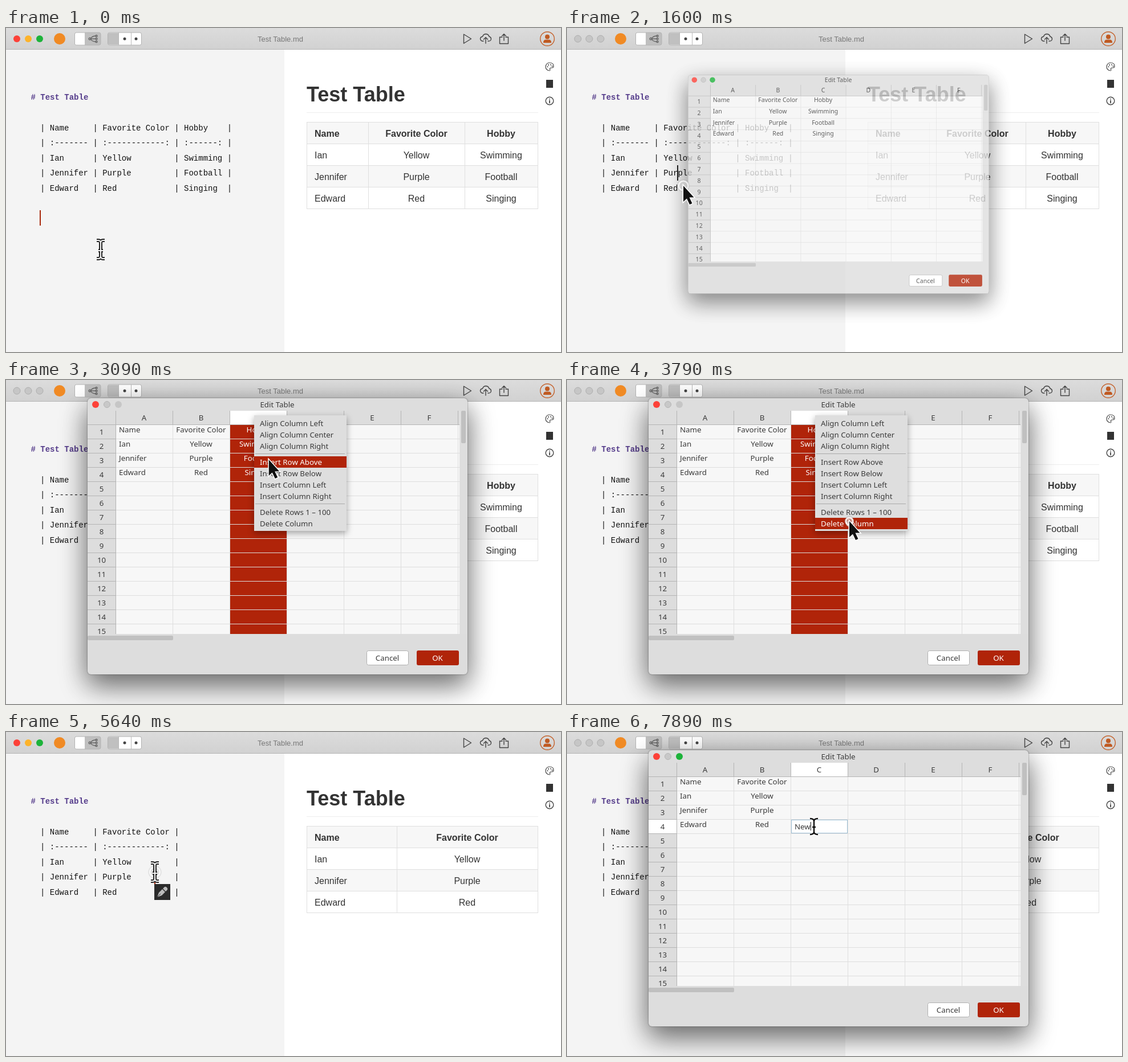
Animation, 973 px wide and 569 px high, one loop 8 s. Source, as an HTML page:

```html
<!DOCTYPE html>
<html lang="en">
<head>
<meta charset="utf-8">
<title>Table editor</title>
<style>
  html, body { margin: 0; width: 100%; height: 100%; overflow: hidden; background: #fff; }
  svg { display: block; width: 973px; height: 569px; }
  text { white-space: pre; fill: #333; font: 16px "Liberation Sans", Arial, sans-serif; }
  .mid { text-anchor: middle; }
  .bold { font-weight: bold; }
  .code { font: 14px "Liberation Mono", monospace; fill: #111; }
  .head { font-weight: bold; fill: #553c8b; }
  .ui { font: 13.3px "Noto Sans", "Open Sans", sans-serif; fill: #3a3a3a; }
  .light { fill: #fff; }
  .icon { fill: none; stroke: #444; stroke-width: 1.4; stroke-linejoin: round; stroke-linecap: round; }
  #dialog { transform-origin: 476px 274.5px; }
  #frame { filter: drop-shadow(0 18px 24px rgba(0,0,0,.45)) drop-shadow(0 0 1px rgba(0,0,0,.5)); }
  #menu > rect:first-child { filter: drop-shadow(0 4px 6px rgba(0,0,0,.35)); }
</style>
</head>
<body>
<svg viewBox="0 0 973 569">
  <defs>
    <linearGradient id="chrome" x2="0" y2="1">
      <stop stop-color="#dcdcdc"/><stop offset="1" stop-color="#d1d1d1"/>
    </linearGradient>
  </defs>
  <rect width="973" height="569" fill="#fff"/>
  <rect y="37" width="488" height="532" fill="#f4f4f4"/>
  <rect width="973" height="38" fill="url(#chrome)"/>
  <rect y="37" width="973" height="1" fill="#b4b4b4"/>

  <g id="lights"></g>
  <circle cx="94" cy="19" r="10" fill="#f08a24"/>
  <rect x="120.500" y="8" width="45.500" height="22" rx="3" fill="#bfbfbf" stroke="#b2b2b2"/>
  <path d="M123 8.500H138V29.500H123Q121 29.500 121 27V11Q121 8.500 123 8.500" fill="#fff"/>
  <g class="icon" stroke-width="1.200" style="stroke:#666">
    <path d="M148 19H157M148 19Q151 14 157 14M148 19Q151 24 157 24"/>
    <circle cx="147" cy="19" r="1.800"/><circle cx="158.500" cy="14" r="1.500"/>
    <circle cx="158.500" cy="19" r="1.500"/><circle cx="158.500" cy="24" r="1.500"/>
  </g>
  <rect x="178.500" y="8" width="59" height="22" rx="3" fill="#fff" stroke="#b2b2b2"/>
  <path d="M179 8.500H197V29.500H179Z" fill="#c0c0c0"/>
  <path d="M197.500 8V30M219.500 8V30" stroke="#b8b8b8"/>
  <circle cx="208" cy="19" r="2.500" fill="#444"/><circle cx="228" cy="19" r="2.500" fill="#444"/>
  <text class="mid" x="481" y="24" style="font-size:13px;fill:#777">Test Table.md</text>

  <g class="icon">
    <path d="M802.500 11V27L815.500 19Z"/>
    <path d="M837 23H835Q831.500 22 831.500 18.500Q832 15.500 835.500 15Q837 10.500 841.500 10.500Q846 11 847 15Q850.500 16 850.500 19.500Q850 23 846 23H845M841 27V17M837.500 20L841 16.500L844.500 20"/>
    <path d="M870 16H865.500V27.500H880.500V16H876M873 22V10.500M869.500 14L873 10.500L876.500 14"/>
    <path d="M953 75Q946 74 946 68Q947 61 953 61Q960 61 960 67Q960 70 956 70Q952 70 954 74" stroke-width="1.200"/>
    <path d="M949.500 68V68.100M951 64.800V64.900M955 64.500V64.600M957.500 67V67.100" stroke-width="2"/>
    <circle cx="953" cy="128" r="6.800"/><path d="M953 127.500V131.500M953 124.600V124.700" stroke-width="1.800"/>
  </g>
  <rect x="947" y="91" width="12" height="14" fill="#333"/>
  <circle cx="949" cy="19" r="12.300" fill="none" stroke="#c4622c" stroke-width="1.400"/>
  <circle cx="949" cy="15.500" r="4" fill="#c05a22"/>
  <path d="M942 26Q942 20.500 946 20.500H952Q956 20.500 956 26Z" fill="#c05a22"/>

  <text class="code head" x="43.500" y="126">#&#160;Test&#160;Table</text>
  <text class="bold" x="527" y="129" style="font-size:36px">Test Table</text>
  <rect x="527" y="148" width="406" height="1" fill="#eee"/>
  <g id="wide"></g>
  <g id="narrow"></g>
  <rect id="caret" width="2" height="27"/>
  <g id="pen">
    <rect width="28" height="28" fill="#2b2b2b"/>
    <path d="M5 23L8 15L14 9L19 14L13 20ZM15 8L18 5Q20 4 22 6Q24 8 23 10L20 13Z" fill="#bbb"/>
    <path d="M5 23L11 17" stroke="#2b2b2b"/>
  </g>
  <g id="dialog"></g>
  <g id="menu"></g>
  <circle id="ring" stroke="#fff" stroke-width="3" fill="#fff" fill-opacity=".4"/>
  <g id="pointer">
    <path id="arrow" d="M0 0V28L6 22.500L11 33L15.500 31L10.500 20.500H18.500Z" fill="#111" stroke="#fff" stroke-width="3" paint-order="stroke"/>
    <g id="beam" fill="none">
      <path id="beamShape" d="M-7-16H-4Q0-16 0-11V11Q0 16-4 16H-7M7-16H4Q0-16 0-11M0 11Q0 16 4 16H7M-4 2H4" stroke="#222" stroke-width="5.500"/>
      <use href="#beamShape" style="stroke:#fff"/>
      <path d="M-7-16H-4Q0-16 0-11V11Q0 16-4 16H-7M7-16H4Q0-16 0-11M0 11Q0 16 4 16H7M-4 2H4" stroke="#f4f4f4" stroke-width="2"/>
    </g>
    <g id="thinBeam" fill="none">
      <path d="M-7-14Q0-14 0-9V9Q0 14-7 14M7-14Q0-14 0-9V9Q0 14 7 14M-3 1H3" stroke="#fff" stroke-width="4.500"/>
      <path d="M-7-14Q0-14 0-9V9Q0 14-7 14M7-14Q0-14 0-9V9Q0 14 7 14M-3 1H3" stroke="#111" stroke-width="2.400"/>
    </g>
  </g>
</svg>
<script>
const LOOP = 8000, RED = '#b02409';
const $ = id => document.getElementById(id);
const show = (id, on) => $(id).style.display = on ? '' : 'none';
const set = (id, attrs) => { for (const k in attrs) $(id).setAttribute(k, attrs[k]); };
const text = (x, y, s, cls = '') => `<text x="${x}" y="${y}" class="${cls}">${s}</text>`;
const rect = (x, y, w, h, fill, more = '') => `<rect x="${x}" y="${y}" width="${w}" height="${h}" fill="${fill}" ${more}/>`;
const dot = (x, y, r, fill, more = '') => `<circle cx="${x}" cy="${y}" r="${r}" fill="${fill}" ${more}/>`;
const range = n => [...Array(n).keys()];

const data = [
  ['Name', 'Favorite Color', 'Hobby'],
  ['Ian', 'Yellow', 'Swimming'],
  ['Jennifer', 'Purple', 'Football'],
  ['Edward', 'Red', 'Singing']
];

// Markdown text on the left, rendered table on the right
function documentTable(edges) {
  const n = edges.length - 1, pads = [8, 14, 8];
  const line = cells => '| ' + cells.slice(0, n).map((c, i) => c.padEnd(pads[i])).join(' | ') + ' |';
  const lines = data.map(line);
  lines.splice(1, 0, line([':-------', ':------------:', ':------:']));
  let out = lines.map((s, i) => text(60, Math.round(179.6 + i * 26.5), s.replace(/ /g, '\u00a0'), 'code')).join('');
  out += rect(527, 165, 406, 38, '#f7f7f7') + rect(527, 241, 406, 38, '#f7f7f7');
  out += range(5).map(i => rect(527, 165 + i * 38, 406, 1, '#dfdfdf')).join('');
  out += edges.map(x => rect(x, 165, 1, 153, '#dfdfdf')).join('');
  data.forEach((row, r) => row.slice(0, n).forEach((s, c) => {
    const cls = (c ? 'mid ' : '') + (r ? '' : 'bold');
    out += text(c ? (edges[c] + edges[c + 1]) / 2 : 541, 191 + r * 38 - (r ? 1 : 0) + (r ? 1 : 0), s, cls);
  }));
  return out;
}

function cellText(c, cls = '') {
  return data.map((row, r) => text(c ? 242 + c * 100 : 198, 92 + r * 25, row[c], `ui ${c ? 'mid' : ''} ${cls}`)).join('');
}

function dialogMarkup() {
  const rows = range(15), cols = range(6);
  return rect(143, 32, 666, 485, '#dddddd', 'rx="6" id="frame"') +
    dot(157, 43, 6, '#fc4138') + dot(177, 43, 5.5, '#c8c8c8', 'stroke="#b5b5b5"') + dot(197, 43, 6, '#1db33a', 'id="zoom"') +
    text(475.5, 48, 'Edit Table', 'ui mid') +
    rect(193, 79, 602, 367, '#f7f7f7') +
    `<g id="selection">${rect(393, 79, 99, 367, RED)}</g>` +
    rows.map(i => rect(193, 103 + i * 25, 602, 1, '#dedede')).join('') +
    [0, ...cols].map((c, i) => rect(192 + i * 100, 79, 1, 367, '#dedede')).join('') +
    cellText(0) + cellText(1) +
    `<g id="hobby">${cellText(2)}</g><g id="hobbySelected">${cellText(2, 'light')}</g>` +
    rect(393, 54, 99, 24, '#fff', 'id="headC"') + rect(143, 154, 49, 24, '#fff', 'id="headRow"') +
    cols.map(c => rect(192 + c * 100, 54, 1, 24, '#b4b4b4') + text(242 + c * 100, 71, 'ABCDEF'[c], 'ui mid')).join('') +
    rect(792, 54, 1, 24, '#b4b4b4') + rect(143, 78, 652, 1, '#b4b4b4') + rect(192, 54, 1, 392, '#b4b4b4') +
    rows.map(i => rect(143, 103 + i * 25, 49, 1, '#b4b4b4') + text(167.5, 96 + i * 25, i + 1, 'ui mid')).join('') +
    `<g id="editor">${rect(393.5, 154.5, 98, 23, '#fff', 'stroke="#9dbfd6"')}
      <text id="typed" class="ui" x="399" y="171"></text>${rect(399, 158, 1, 15, '#111', 'id="typeCaret"')}</g>` +
    rect(144, 446, 664, 64, '#dddddd') + rect(795, 54, 13, 392, '#dedede') +
    rect(798, 54, 8, 57, '#c0c0c0', 'rx="2"') + rect(143, 449, 150, 8, '#c0c0c0', 'rx="2"') +
    rect(632.5, 475.5, 73, 25, '#fff', 'rx="3" stroke="#b0b0b0"') + text(668.5, 493, 'Cancel', 'ui mid') +
    rect(720, 475, 74, 26, RED, 'rx="3"') + text(756.5, 493, 'OK', 'ui mid light');
}

const items = [
  [76, 'Align Column Left'], [96, 'Align Column Center'], [116, 'Align Column Right'],
  [144, 'Insert Row Above'], [164, 'Insert Row Below'], [184, 'Insert Column Left'], [204, 'Insert Column Right'],
  [232, 'Delete Rows 1 – 100'], [252, 'Delete Column']
];

$('lights').innerHTML = [19, 39, 59].map(x => dot(x, 19, 6, '')).join('');
$('wide').innerHTML = documentTable([527, 635, 804, 932]);
$('narrow').innerHTML = documentTable([527, 685, 932]);
$('dialog').innerHTML = dialogMarkup();
$('menu').innerHTML = rect(435, 62, 162, 203, '#dedede') +
  rect(437, 129, 157, 1, '#aaa') + rect(437, 217, 157, 1, '#aaa') + rect(435, 0, 162, 20, RED, 'id="hover"') +
  items.map(([y, s]) => text(445, y + 5, s, 'ui item')).join('');

// Pointer moves: start, end, x, y, bend
const moves = [
  [150, 720, 194, 256], [950, 1350, 204, 277], [1800, 2360, 436, 62], [2850, 3390, 495, 248],
  [4000, 4490, 757, 488, 64], [4950, 5450, 261, 246], [5800, 6080, 272, 283],
  [6400, 6740, 430, 165], [7130, 7150, 433, 166]
];
const clicks = [720, 1480, 2400, 3750, 4720, 5500, 6110, 6950, 7080];

function pointerAt(t) {
  let x = 166, y = 389;
  for (const [start, end, tx, ty, bend = 0] of moves) {
    if (t < start) break;
    const p = Math.min(1, (t - start) / (end - start)), s = p * p * (3 - 2 * p);
    x += (tx - x) * s;
    y += (ty - y) * s + bend * 4 * s * (1 - s);
  }
  return [x, y];
}

function draw(t) {
  const during = (a, b) => t >= a && t < b;
  const [x, y] = pointerAt(t);
  const open = during(1500, 4950) || t >= 6140;
  const editing = t >= 7130;

  // Main window
  const colors = open ? ['#c6c6c6', '#c6c6c6', '#c6c6c6'] : ['#fc4138', '#fdb32a', '#1db33a'];
  [...$('lights').children].forEach((c, i) => {
    c.setAttribute('fill', colors[i]);
    c.setAttribute('stroke', open ? '#adadad' : 'none');
  });
  show('wide', t < 4850);
  show('narrow', t >= 4850);
  const caretX = t < 720 ? 59 : t < 5500 ? 193 : 260;
  set('caret', { x: caretX, y: t < 720 ? 320 : 241, fill: open ? '#222' : '#a8280c' });
  show('caret', open || t % 1000 < 500 || during(720, 1200) || during(5500, 6000));
  const pen = during(780, 1500) || during(5560, 6140);
  show('pen', pen);
  set('pen', { transform: `translate(${caretX} 267)` });

  // Dialog
  show('dialog', open);
  const p = Math.min(1, (t - (t < 5000 ? 1500 : 6140)) / 200);
  $('dialog').style.transform = `scale(${0.58 + 0.42 * p})`;
  $('dialog').style.opacity = during(4800, 4950) ? 1 - (t - 4800) / 150 : Math.min(1, 1.56 * p);
  const selected = during(2400, 3900), menu = during(2700, 3870);
  show('selection', selected);
  show('hobby', t < 2400);
  show('hobbySelected', selected);
  show('headC', during(2500, 3900) || t >= 6950);
  show('headRow', t >= 6950);
  set('zoom', { fill: menu ? '#c6c6c6' : '#1db33a' });
  show('editor', editing);
  const typed = 'New'.slice(0, [7590, 7840, 7890].filter(k => t >= k).length);
  $('typed').textContent = typed;
  set('typeCaret', { x: 399 + (typed ? $('typed').getComputedTextLength() : 0) });
  show('typeCaret', typed || (t - 7130) % 600 < 300);

  // Context menu
  show('menu', menu);
  const active = items.findIndex(([c]) => Math.abs(y - c) <= 10);
  show('hover', active >= 0);
  if (active >= 0) set('hover', { y: items[active][0] - 10 });
  document.querySelectorAll('.item').forEach((el, i) => el.classList.toggle('light', i === active));

  // Pointer and click ring
  const beam = !open && x < 488 && !(pen && y > 267);
  set('pointer', { transform: `translate(${x} ${y})` });
  show('beam', beam);
  show('thinBeam', editing);
  show('arrow', !beam && !editing);
  const click = clicks.find(c => during(c, c + 220));
  show('ring', click !== undefined);
  if (click !== undefined) {
    const q = (t - click) / 220;
    set('ring', { cx: x, cy: y, r: 5 + 6 * q, opacity: 1 - q * 0.6, style: 'filter:drop-shadow(0 0 1px #777)' });
  }
}

function tick() {
  draw(performance.now() % LOOP);
  requestAnimationFrame(tick);
}
tick();
</script>
</body>
</html>
```
